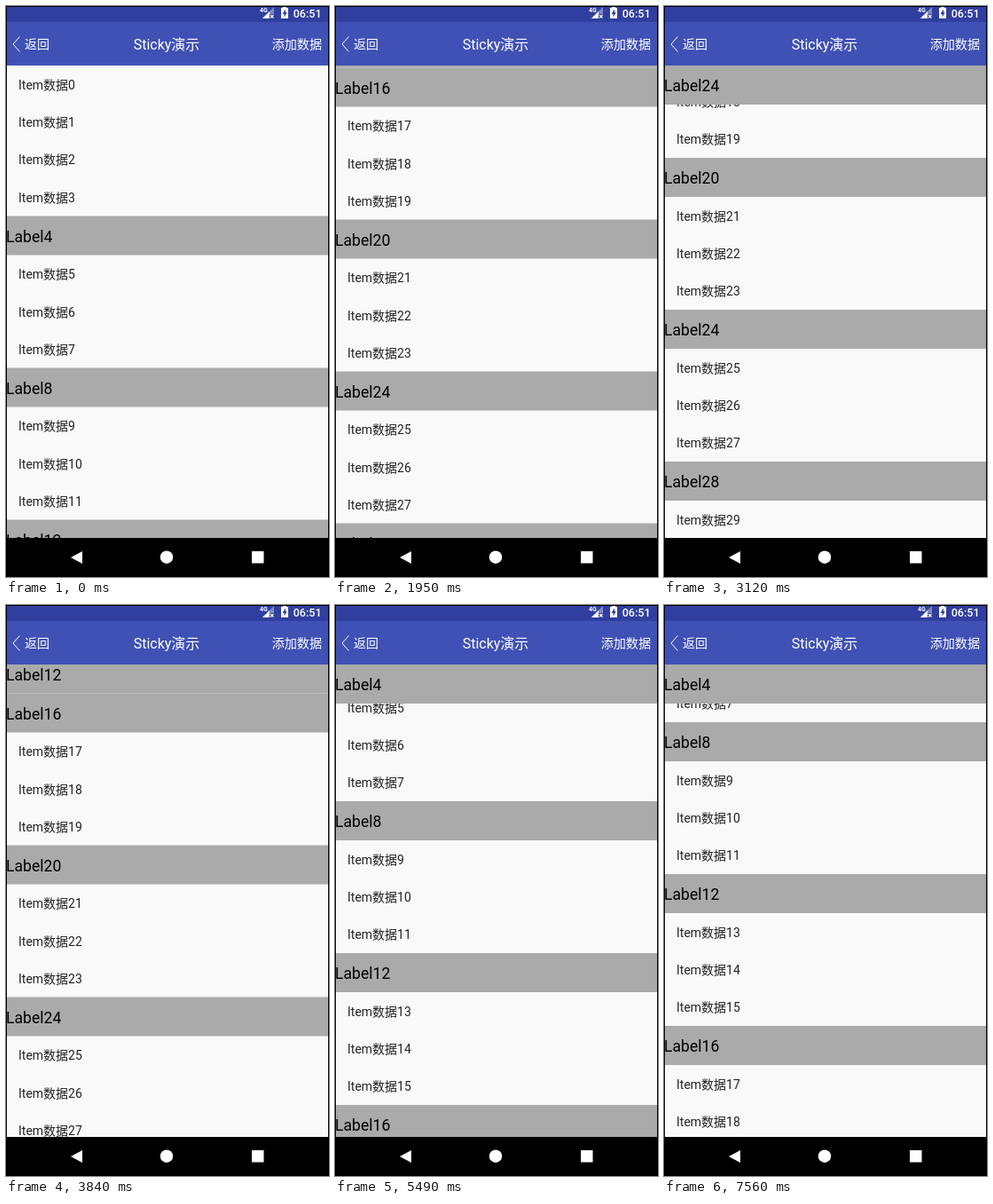
An HTML page with a canvas that plays this animation: 364 by 643 pixels, repeating every 8160 ms.

```html
<!DOCTYPE html>
<html lang="zh">
<head>
<meta charset="utf-8">
<title>Sticky演示</title>
<style>
  html, body { margin: 0; width: 100%; height: 100%; overflow: hidden; background: #000; }
  canvas { display: block; }
</style>
</head>
<body>
<canvas id="stage" width="364" height="643"></canvas>
<script>
const ctx = document.getElementById('stage').getContext('2d');
const FONT = 'Roboto, "Noto Sans CJK SC", "Noto Sans CJK", sans-serif';
const LOOP = 8160, STEP = 30;
const TOP = 67, BOTTOM = 599, WIDTH = 364;
const LABEL_H = 44, ITEM_H = 127 / 3, GROUP_H = 171, FIRST_LABEL = 169.5;

// Scroll offset over time: [ms, px]
const scrollKeys = [
  [0, 0], [600, 0], [780, 120], [960, 330], [1200, 490], [1530, 560],
  [1740, 560], [1950, 680], [2130, 900], [2340, 1060], [2580, 1100],
  [2640, 1100], [2850, 960], [3120, 749.5], [3420, 650], [3990, 650],
  [4560, 488], [4860, 300], [5490, 186.5], [5790, 186.5], [6300, 456],
  [6600, 500], [6640, 500], [7050, 340], [7560, 275.5], [LOOP, 275.5]
];

const secant = i => {
  const a = scrollKeys[i], b = scrollKeys[i + 1];
  return a && b ? (b[1] - a[1]) / (b[0] - a[0]) : 0;
};

// Monotone slope: flat at every rest and turning point
const slope = i => {
  const a = secant(i - 1), b = secant(i);
  return a * b > 0 ? 2 * a * b / (a + b) : 0;
};

function scrollAt(t) {
  const i = scrollKeys.findIndex((key, n) => n && t <= key[0]) - 1;
  const [t0, y0] = scrollKeys[i], [t1, y1] = scrollKeys[i + 1];
  const d = t1 - t0, u = (t - t0) / d, v = 1 - u;
  return v * v * (1 + 2 * u) * y0 + u * u * (3 - 2 * u) * y1
    + d * u * v * (v * slope(i) - u * slope(i + 1));
}

// The pinned label falls behind the fast backward fling, then catches up
function pinnedScrollAt(t) {
  if (t < 2580 || t > 3840) return scrollAt(t);
  const u = Math.max(0, (t - 3420) / 420);
  return 1100 - 450 * u;
}

function rect(x, y, w, h, color) {
  ctx.fillStyle = color;
  ctx.fillRect(x, y, w, h);
}

function text(str, x, y, size, color, align = 'left', weight = 400) {
  ctx.font = `${weight} ${size}px ${FONT}`;
  ctx.textAlign = align;
  ctx.fillStyle = color;
  ctx.fillText(str, x, y);
}

function shape(points, color) {
  ctx.beginPath();
  points.forEach(([x, y]) => ctx.lineTo(x, y));
  ctx.closePath();
  ctx.fillStyle = color;
  ctx.fill();
}

function line(points, color, width) {
  ctx.beginPath();
  points.forEach(([x, y]) => ctx.lineTo(x, y));
  ctx.strokeStyle = color;
  ctx.lineWidth = width;
  ctx.stroke();
}

const labelTop = group => FIRST_LABEL + (group - 1) * GROUP_H;

function drawLabel(group, y) {
  rect(0, y, WIDTH, LABEL_H, '#aaa');
  text('Label' + group * 4, 0, y + 29, 17.6, '#000');
}

function drawList(t) {
  const scroll = scrollAt(t);
  ctx.save();
  ctx.beginPath();
  ctx.rect(0, TOP, WIDTH, BOTTOM - TOP);
  ctx.clip();
  rect(0, TOP, WIDTH, BOTTOM - TOP, '#f9f9f9');

  for (let n = 0; n < 48; n++) {
    const group = Math.floor(n / 4), k = n % 4;
    const y = TOP - scroll + (group
      ? labelTop(group) + (k ? LABEL_H + (k - 1) * ITEM_H : 0)
      : k * ITEM_H);
    if (y < TOP - 50 || y > BOTTOM) continue;
    if (group && !k) drawLabel(group, y);
    else text('Item数据' + n, 14, y + 26.7, 14, '#222');
  }

  const pinned = pinnedScrollAt(t);
  const group = Math.floor((pinned - FIRST_LABEL) / GROUP_H) + 1;
  if (group > 0) {
    const push = Math.min(0, labelTop(group + 1) - pinned - LABEL_H);
    drawLabel(group, TOP + push);
  }
  ctx.restore();
}

function drawStatusBar() {
  rect(0, 0, WIDTH, 18, '#303f9f');
  text('4G', 286, 7, 7, '#fff', 'left', 700);
  shape([[289, 14], [302, 14], [302, 1]], '#8089c5');
  shape([[289, 14], [297, 14], [297, 6]], '#fff');
  rect(297, 9, 5, 5, '#303f9f');
  line([[298, 10], [301.5, 13.5]], '#fff', 1.1);
  line([[301.5, 10], [298, 13.5]], '#fff', 1.1);
  rect(312, 1, 4, 2, '#fff');
  rect(310, 2, 8, 12, '#fff');
  shape([[315, 3.5], [311.5, 9], [313.5, 9], [313.5, 12.5], [316.8, 7.3], [315, 7.3]], '#303f9f');
  text('06:51', 355.5, 12.5, 12.5, '#fff', 'right', 500);
}

function drawToolbar() {
  rect(0, 18, WIDTH, TOP - 18, '#3f51b5');
  line([[15.5, 34.5], [8, 43], [15.5, 51.5]], '#fff', 1);
  text('返回', 21, 48, 14, '#fff');
  text('Sticky演示', 181, 48.7, 16, '#fff', 'center');
  text('添加数据', 356, 48, 14.1, '#fff', 'right');
}

function drawNavBar() {
  rect(0, BOTTOM, WIDTH, 643 - BOTTOM, '#000');
  shape([[73, 621], [86, 614], [86, 628]], '#fff');
  ctx.beginPath();
  ctx.arc(181, 620.7, 7.2, 0, 7);
  ctx.fill();
  rect(277, 614, 13.5, 13.5, '#fff');
}

function drawEdges() {
  rect(0, 0, WIDTH, 1, '#000');
  rect(0, 0, 1, 643, '#000');
  rect(363, 0, 1, 643, '#000');
}

function frame(now) {
  const t = Math.floor(now % LOOP / STEP) * STEP;
  drawStatusBar();
  drawToolbar();
  drawList(t);
  drawNavBar();
  drawEdges();
  requestAnimationFrame(frame);
}
requestAnimationFrame(frame);
</script>
</body>
</html>
```
